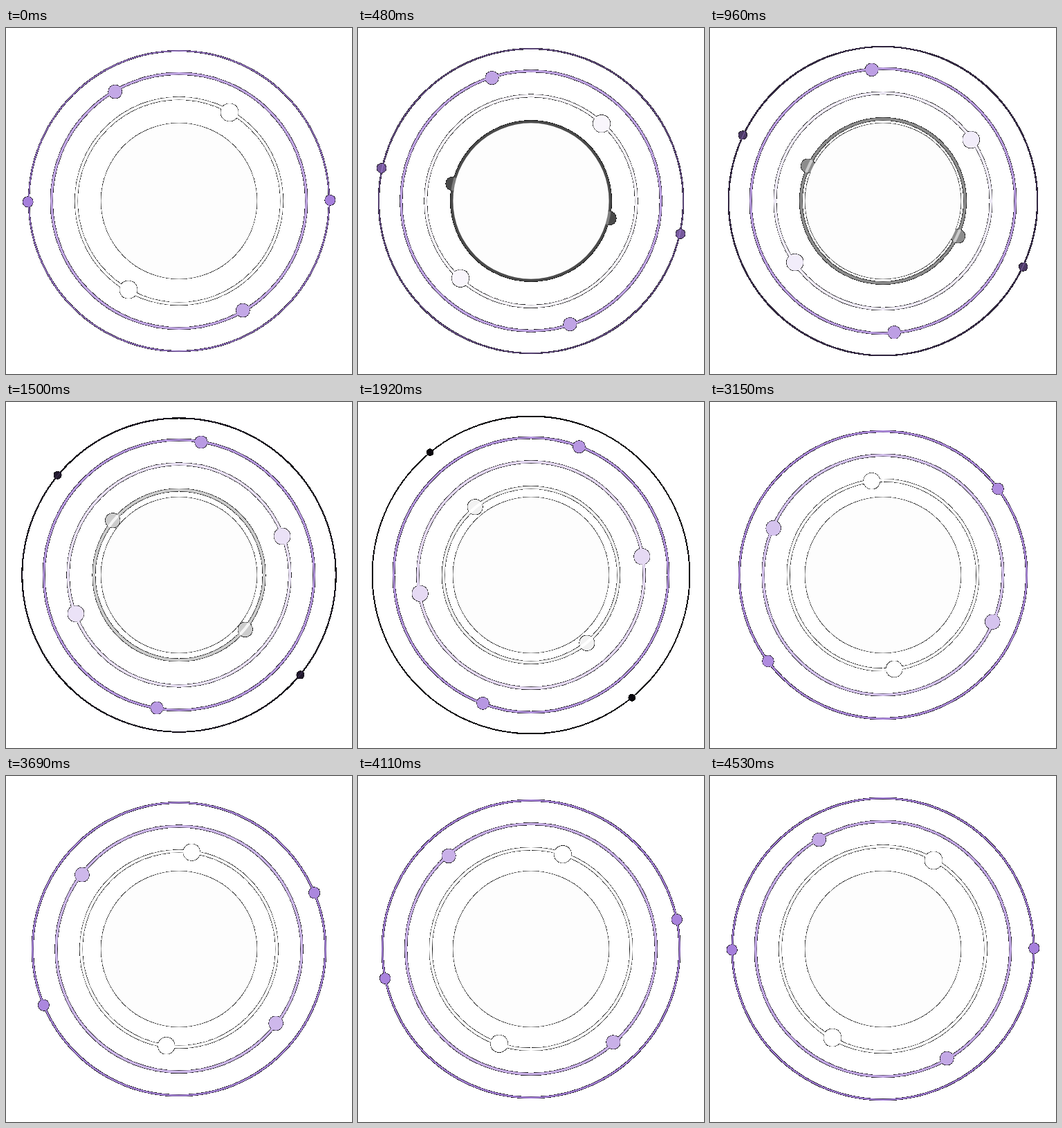
An HTML page with a canvas for the animation above (4.56 s loop, 500x500 px).

```html
<!DOCTYPE html>
<html lang="en">
<head>
<meta charset="utf-8">
<title>Orbiting rings</title>
<style>
  html, body { margin: 0; width: 100%; height: 100%; overflow: hidden; background: #fff; }
  canvas { display: block; }
</style>
</head>
<body>
<canvas id="stage" width="500" height="500"></canvas>
<script>
const SIZE = 500, LOOP = 4560, STEP = 30;
const TURN = LOOP - STEP; // the last step repeats the first pose
const FADE = 0.475;       // share of a turn spent fading in or out

const ctx = document.getElementById('stage').getContext('2d', { willReadFrequently: true });

// Orbit radius of the balls, ball radius, outer ring edge, ring width, colour
const BORN = [112.3, 9.5, 112.5, 4, 255, 255, 255];
const WHITE = [147.5, 12.8, 150.5, 4, 255, 255, 255];
const LILAC = [183, 9.8, 185.9, 3.4, 195, 168, 230];
const PURPLE = [218.3, 7.5, 219, 2.2, 166, 127, 220];
const LEAVING = [218.3, 7.4, 217.8, 1.6, 166, 127, 220];
const GONE = [231, 4.7, 231.4, 1, 166, 127, 220];
const STAGES = [[BORN, WHITE], [WHITE, LILAC], [LILAC, PURPLE], [LEAVING, GONE]];

const fadeOut = phase => Math.max(0, 1 - phase / FADE) ** 1.35;

function circle(x, y, r) {
  ctx.beginPath();
  ctx.arc(x, y, r, 0, Math.PI * 2);
}

function drawOrbit([from, to], stage, phase) {
  const last = stage === STAGES.length - 1;
  const k = last ? phase / FADE : phase;
  if (k > 1) return;
  const [orbit, ball, edge, width, ...rgb] = from.map((v, i) => v + (to[i] - v) * k);
  const angle = (120 * (stage - 1 + phase) - 60.3) * Math.PI / 180;

  ctx.globalAlpha = last ? fadeOut(phase) : stage === 0 ? 1 - fadeOut(phase) : 1;
  ctx.strokeStyle = ctx.fillStyle = `rgb(${rgb.map(Math.round)})`;
  ctx.lineWidth = width;
  circle(0, 0, edge - width / 2);
  ctx.stroke();
  for (const side of [-1, 1]) {
    circle(side * orbit * Math.cos(angle), side * orbit * Math.sin(angle), ball);
    ctx.fill();
  }
}

// Blend every touched pixel with black and leave the rest white:
// soft edges become thin dark outlines
function matteOnBlack() {
  const image = ctx.getImageData(0, 0, SIZE, SIZE);
  const px = image.data;
  for (let i = 0; i < px.length; i += 4) {
    const alpha = px[i + 3];
    for (let c = i; c < i + 3; c++) px[c] = alpha ? px[c] * alpha / 255 : 255;
    px[i + 3] = 255;
  }
  ctx.putImageData(image, 0, 0);
}

function render(ms) {
  const phase = Math.floor(ms % LOOP / STEP) * STEP / TURN;
  ctx.setTransform(1, 0, 0, 1, 0, 0);
  ctx.clearRect(0, 0, SIZE, SIZE);
  ctx.translate(SIZE / 2, SIZE / 2);

  ctx.globalAlpha = 1;
  ctx.fillStyle = '#fdfdfd';
  circle(0, 0, 112.7);
  ctx.fill();
  STAGES.forEach((ends, stage) => drawOrbit(ends, stage, phase));
  matteOnBlack();
}

const start = performance.now();
function tick() {
  render(performance.now() - start);
  requestAnimationFrame(tick);
}
tick();
</script>
</body>
</html>
```
